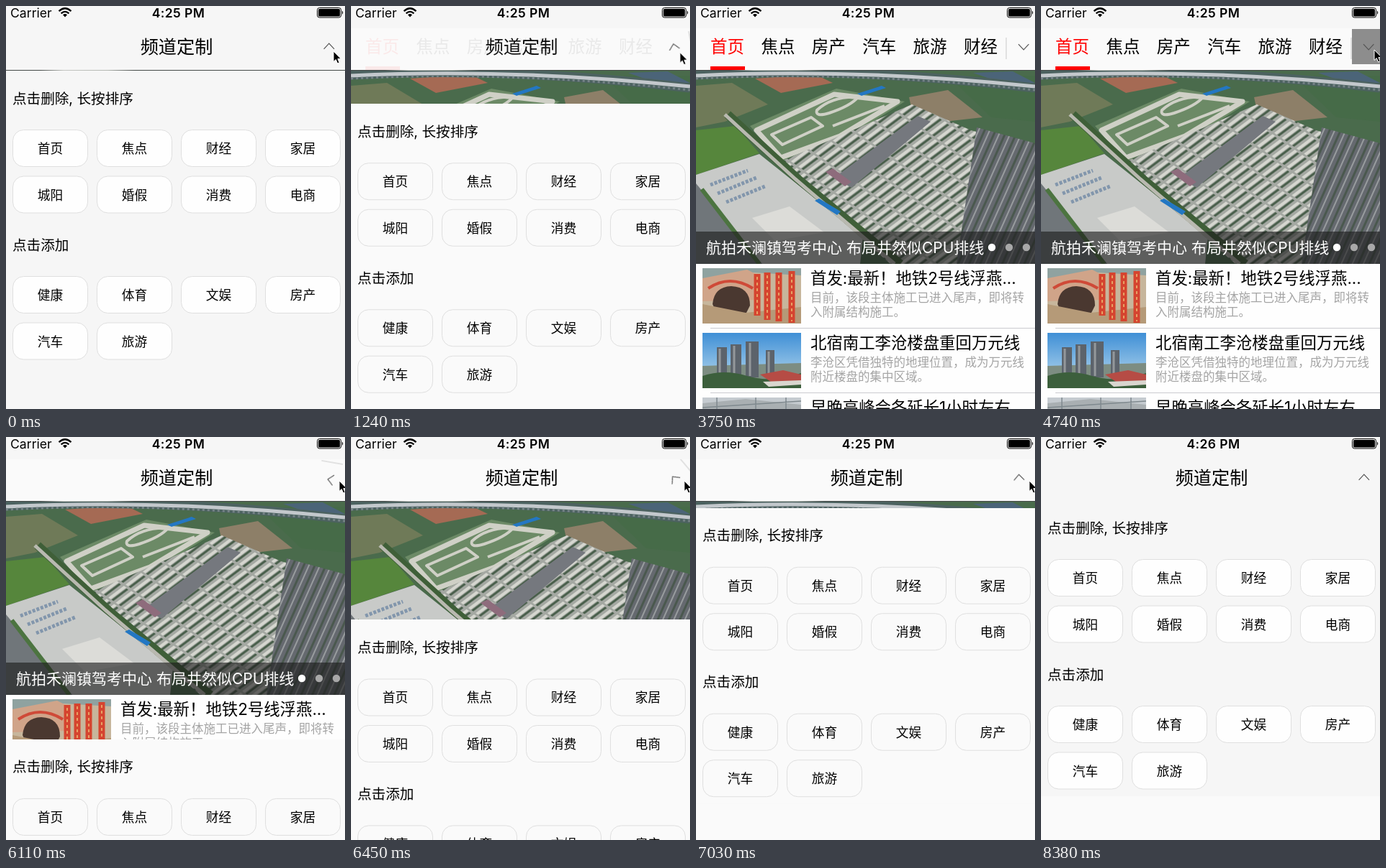
Recreate the animation shown at these times as an HTML page. Size 471 by 561 pixels, loop 9.26 s.

```html
<!DOCTYPE html>
<html lang="zh-CN">
<head>
<meta charset="utf-8">
<title>频道定制</title>
<style>
html, body { margin: 0; width: 100%; height: 100%; overflow: hidden; background: #fff; }
svg { display: block; }
text { font-family: Inter, "Noto Sans CJK SC", "Noto Sans CJK", sans-serif; fill: #000; white-space: pre; }
.mid { text-anchor: middle; }
.tab { font-size: 23.5px; }
.tab:first-child { fill: #f00; }
.head { font-size: 22.4px; }
.note { font-size: 16.5px; font-weight: 300; fill: #a4a4a4; }
.label { font-size: 19.6px; }
.chip text { font-size: 17.7px; }
.chip rect { stroke: #dfdfdf; }
.time { font-size: 17.5px; font-weight: 600; letter-spacing: .4px; }

.panel, .turn, .cover, .press, .cursor, .settle, .foot, .chip rect, .t25, .t26 {
  animation: 9.26s step-end infinite;
}
.panel { animation-name: slide; }
.turn { animation-name: turn; transform-origin: 452px 56.5px; }
.cover { animation-name: cover; }
.press { animation-name: press; }
.cursor { animation-name: cursor; }
.settle { animation-name: settle; }
.foot { animation-name: foot; }
.chip rect { animation-name: chip; }
.t25 { animation-name: before; }
.t26 { animation-name: after; }

@keyframes slide {
  0% { transform: translateY(2px); }
  .53% { transform: translateY(0); }
  12.6% { transform: translateY(0); animation-timing-function: ease-in-out; }
  17.1% { transform: translateY(749px); }
  52.16% { transform: translateY(749px); animation-timing-function: ease-in-out; }
  78.15%, 100% { transform: translateY(0); }
}
@keyframes turn {
  0% { transform: rotate(180deg); }
  12.6% { transform: rotate(180deg); animation-timing-function: ease-in-out; }
  17.1% { transform: rotate(0deg); }
  52.16% { transform: rotate(0deg); animation-timing-function: ease-in-out; }
  78.15%, 100% { transform: rotate(180deg); }
}
@keyframes cover {
  0% { opacity: 1; }
  12.6% { opacity: 1; animation-timing-function: ease-in-out; }
  17.1% { opacity: 0; }
  52.16% { opacity: 0; animation-timing-function: linear; }
  56.2%, 100% { opacity: 1; }
}
@keyframes press {
  0%, 52.1%, 100% { opacity: 0; }
  51.18% { opacity: 1; }
}
@keyframes cursor {
  0% { transform: translate(455px, 63px); }
  12.8% { transform: translate(455px, 63px); animation-timing-function: ease-in; }
  15.5% { transform: translate(482px, 85px); }
  40.4% { transform: translate(474px, 326px); animation-timing-function: ease-in; }
  43.2% { transform: translate(350px, 190px); animation-timing-function: linear; }
  46% { transform: translate(432px, 12px); animation-timing-function: ease-out; }
  48.6% { transform: translate(463px, 61px); }
  87.9% { transform: translate(463px, 61px); animation-timing-function: linear; }
  89.7% { transform: translate(437px, 329px); animation-timing-function: linear; }
  90.4%, 100% { transform: translate(482px, 330px); }
}
@keyframes settle {
  0%, 78.4%, 100% { fill: #f6f6f6; }
  12.8% { fill: #fafafa; }
}
@keyframes foot {
  0% { fill: #f6f6f6; }
  12.8%, 100% { fill: #fafafa; }
}
@keyframes chip {
  0%, 78.4%, 100% { fill: #fefefe; }
  12.8% { fill: #fafafa; }
}
@keyframes before { 0% { opacity: 1; } 88.7%, 100% { opacity: 0; } }
@keyframes after { 0% { opacity: 0; } 88.7%, 100% { opacity: 1; } }
</style>
</head>
<body>
<svg width="471" height="561" viewBox="0 0 471 561">
  <defs>
    <pattern id="rows" width="30" height="12" patternUnits="userSpaceOnUse" patternTransform="rotate(-37) skewX(18)">
      <rect width="30" height="12" fill="#a4a8a2"/>
      <rect y="1" width="27" height="4" fill="#d6d7d0"/>
      <rect y="6" width="26" height="3" fill="#465c48"/>
    </pattern>
    <pattern id="lanes" width="14" height="40" patternUnits="userSpaceOnUse" patternTransform="rotate(24)">
      <rect width="14" height="40" fill="#65696f"/>
      <rect width="2" height="40" fill="#989c9e"/>
      <rect x="7" width="3" height="40" fill="#4a584e"/>
    </pattern>
    <linearGradient id="sky" x2="0" y2="1">
      <stop stop-color="#3f8fd6"/><stop offset="1" stop-color="#c3e0f0"/>
    </linearGradient>
    <linearGradient id="edge">
      <stop offset=".1" stop-color="#454a48"/><stop offset=".17" stop-color="#c4c6c2"/>
      <stop offset=".3" stop-color="#b4b8b2"/><stop offset=".38" stop-color="#454a48"/>
    </linearGradient>
    <clipPath id="frame"><rect width="471" height="270"/></clipPath>
    <clipPath id="thumb"><rect width="137" height="77"/></clipPath>
  </defs>

  <rect width="471" height="561" fill="#fefefe"/>

  <!-- banner -->
  <g transform="translate(0 89)" clip-path="url(#frame)">
    <rect width="471" height="270" fill="#4a6b4c"/>
    <path d="M0 22L50 18L100 48L40 72L0 80Z" fill="#6f7a58"/>
    <path d="M0 84L55 78L88 116L0 146Z" fill="#56863c"/>
    <path d="M82 12L165 6L190 18L118 32Z" fill="#a56a54"/>
    <path d="M296 38L350 28L398 66L345 72L300 56Z" fill="#8d7f68"/>
    <path d="M350 8H471V72L410 66Z" fill="#466b48"/>
    <path d="M385 4L440 2L471 18L430 20Z" fill="#4b6478"/>
    <path d="M75 78L195 26L290 44L205 98L120 128Z" fill="#6c8a66"/>
    <g fill="none" stroke="#cfd0c6" stroke-linejoin="round">
      <path d="M84 84L192 34L280 44L200 92L118 122Z" stroke-width="7"/>
      <path d="M168 56Q190 36 225 38Q215 50 185 60Q165 66 168 56ZM105 90L160 66L176 78L120 104ZM190 78L262 50" stroke-width="4"/>
    </g>
    <path d="M0 146L88 117L232 232L228 270H0Z" fill="#c8cac8"/>
    <path d="M20 160L72 140M30 172L84 150M42 184L96 162" stroke="#8296ac" stroke-width="5" stroke-dasharray="4 2"/>
    <path d="M78 206L130 190L178 226L110 238Z" fill="#dcdcd8"/>
    <path d="M0 158L92 270H0Z" fill="#70767a"/>
    <path d="M8 166L88 270" stroke="#4c7440" stroke-width="6"/>
    <path d="M112 130L300 48L382 84L471 108L400 270H270Z" fill="url(#rows)"/>
    <path d="M390 80L471 102V270H362Z" fill="url(#lanes)"/>
    <path d="M192 150L308 64L326 72L216 164Z" fill="#75787e"/>
    <path d="M44 62L142 152L284 270" fill="none" stroke="#3f5f38" stroke-width="12"/>
    <path d="M40 62L138 152L276 270" fill="none" stroke="#b9b9b0" stroke-width="5"/>
    <path d="M180 142L190 137L216 156L207 162Z" fill="#8e6c7c"/>
    <path d="M224 33L258 22L264 25L230 36ZM165 182L171 179L201 197L196 202Z" fill="#2377c3"/>
    <path d="M0 7Q220 -5 471 25" fill="none" stroke="#4c6260" stroke-width="13"/>
    <path d="M0 8Q220 -3 471 23" fill="none" stroke="#c3c8cc" stroke-width="5"/>
    <path d="M0 12Q220 1 471 28" fill="none" stroke="#778488" stroke-width="3" stroke-dasharray="3 4"/>
    <rect width="471" height="1" fill="url(#edge)"/>
    <rect y="225" width="471" height="45" fill="#1c1c1c" opacity=".62"/>
    <text x="14" y="255" font-size="21" style="fill:#fff">航拍禾澜镇驾考中心 布局井然似CPU排线</text>
    <circle cx="411" cy="247" r="5.2" fill="#fff"/>
    <circle cx="435" cy="247" r="5.2" fill="#a8a8a8"/>
    <circle cx="459" cy="247" r="5.2" fill="#a8a8a8"/>
  </g>

  <!-- stories -->
  <g transform="translate(9 365)" clip-path="url(#thumb)">
    <rect width="137" height="77" fill="#c7b69c"/>
    <path d="M0 0H137V10L70 6L0 16Z" fill="#8fa2a0"/>
    <path d="M0 14L62 2L78 10V44L0 46Z" fill="#d0a489"/>
    <path d="M14 50Q16 26 40 25Q66 26 66 52L60 64H20Z" fill="#4a3830"/>
    <path d="M0 50L60 62L137 54V77H0Z" fill="#b59a78"/>
    <path d="M8 28Q38 8 70 28" fill="none" stroke="#cf4a38" stroke-width="4"/>
    <path d="M76 8V66M90 6V72M106 6V74M124 4V76" stroke="#d5442f" stroke-width="9"/>
    <path d="M76 12V64M90 10V70M106 10V72M124 8V74" stroke="#e8a063" stroke-width="2" stroke-dasharray="4 4"/>
  </g>
  <g transform="translate(9 455)" clip-path="url(#thumb)">
    <rect width="137" height="77" fill="url(#sky)"/>
    <path d="M0 46L137 42V77H0Z" fill="#7d8d82"/>
    <path d="M20 20h14v42h-14zM39 16h15v46h-15zM60 12h18v50h-18zM88 24h12v36h-12z" fill="#5c636b"/>
    <path d="M24 22v38M44 18v42M66 14v46M92 26v32" stroke="#93989b" stroke-width="3"/>
    <path d="M0 60Q30 50 62 60T137 56V77H0Z" fill="#3c5f3c"/>
    <path d="M80 58L112 52L137 58V68L98 70Z" fill="#b64c45"/>
    <path d="M84 68L137 66V72L92 75Z" fill="#d9d6cf"/>
  </g>
  <g transform="translate(9 545)" clip-path="url(#thumb)">
    <rect width="137" height="77" fill="#c5cbd0"/>
    <path d="M0 8L60 2L137 10V16H0Z" fill="#a9afb2"/>
    <path d="M0 14L137 5M20 0V16M74 0V16M116 0V16" stroke="#7f898e" stroke-width="1.5"/>
  </g>
  <path d="M20 448.5H471M20 538.5H471" stroke="#cacacf"/>
  <text class="head" x="159" y="387">首发:最新！地铁2号线浮燕...</text>
  <text class="note" x="159" y="412">目前，该段主体施工已进入尾声，即将转</text>
  <text class="note" x="159" y="431.5">入附属结构施工。</text>
  <text class="head" x="159" y="477">北宿南工李沧楼盘重回万元线</text>
  <text class="note" x="159" y="502">李沧区凭借独特的地理位置，成为万元线</text>
  <text class="note" x="159" y="521.5">附近楼盘的集中区域。</text>
  <text class="head" x="159" y="567">早晚高峰会各延长1小时左右</text>

  <!-- channel panel -->
  <g class="panel">
    <rect class="foot" y="88" width="471" height="473"/>
    <rect class="settle" y="88" width="471" height="412"/>
    <text class="label" x="9" y="133.5">点击删除, 长按排序</text>
    <text class="label" x="9" y="337.5">点击添加</text>
    <g id="chips"></g>
  </g>

  <!-- navigation bar -->
  <rect width="471" height="89" fill="#fafafa"/>
  <g id="tabs"></g>
  <rect x="20" y="84" width="48" height="5" fill="#f00"/>
  <g class="cover">
    <rect class="settle" y="30" width="471" height="59"/>
    <text class="mid" x="237" y="66" font-size="25.2">频道定制</text>
  </g>
  <rect class="press" x="432" y="32" width="39" height="49" fill="#8d8d8d"/>
  <g class="turn" fill="none">
    <path d="M431 44V74" stroke="#d9d9d9" stroke-width="1.5"/>
    <path d="M448 53.2L455.2 60.8L462.4 53.2" stroke="#555" stroke-width="1.2"/>
  </g>

  <!-- status bar -->
  <rect width="471" height="31" fill="#f6f6f6"/>
  <text x="6" y="16" font-size="17.6">Carrier</text>
  <g fill="none" stroke="#000" stroke-width="2.3">
    <path d="M73.5 7.2Q82 -.6 90.5 7.2M76.6 10.4Q82 5.4 87.4 10.4"/>
    <path d="M79 12.2Q82 9.8 85 12.2L82 15.5Z" fill="#000" stroke="none"/>
  </g>
  <text class="time mid t25" x="239.5" y="16">4:25 PM</text>
  <text class="time mid t26" x="239.5" y="16">4:26 PM</text>
  <rect x="432.5" y="2.5" width="33" height="13.5" rx="3" fill="none" stroke="#000"/>
  <rect x="434" y="4" width="30" height="10.5" rx="1.5"/>
  <path d="M467 6.5Q469.5 9.2 467 12Z"/>

  <path class="cursor" d="M0 0V14.5L3.3 11.5L5.6 17L8.2 16L5.9 10.6H10.4Z" stroke="#fff"/>
</svg>
<script>
const NS = 'http://www.w3.org/2000/svg';

function add(parent, tag, attrs, text = '') {
  const el = document.createElementNS(NS, tag);
  for (const key in attrs) el.setAttribute(key, attrs[key]);
  el.textContent = text;
  return parent.appendChild(el);
}

function addChips(names, top) {
  names.split(' ').forEach((name, i) => {
    const x = 9.5 + (i % 4) * 117;
    const y = top + Math.floor(i / 4) * 64.5;
    const chip = add(document.getElementById('chips'), 'g', { class: 'chip' });
    add(chip, 'rect', { x, y, width: 104, height: 51, rx: 15 });
    add(chip, 'text', { class: 'mid', x: x + 52, y: y + 32.5 }, name);
  });
}

addChips('首页 焦点 财经 家居 城阳 婚假 消费 电商', 170.5);
addChips('健康 体育 文娱 房产 汽车 旅游', 374.5);

'首页 焦点 房产 汽车 旅游 财经'.split(' ').forEach((name, i) =>
  add(document.getElementById('tabs'), 'text', { class: 'tab', x: 20 + i * 70.4, y: 65 }, name));
</script>
</body>
</html>
```
